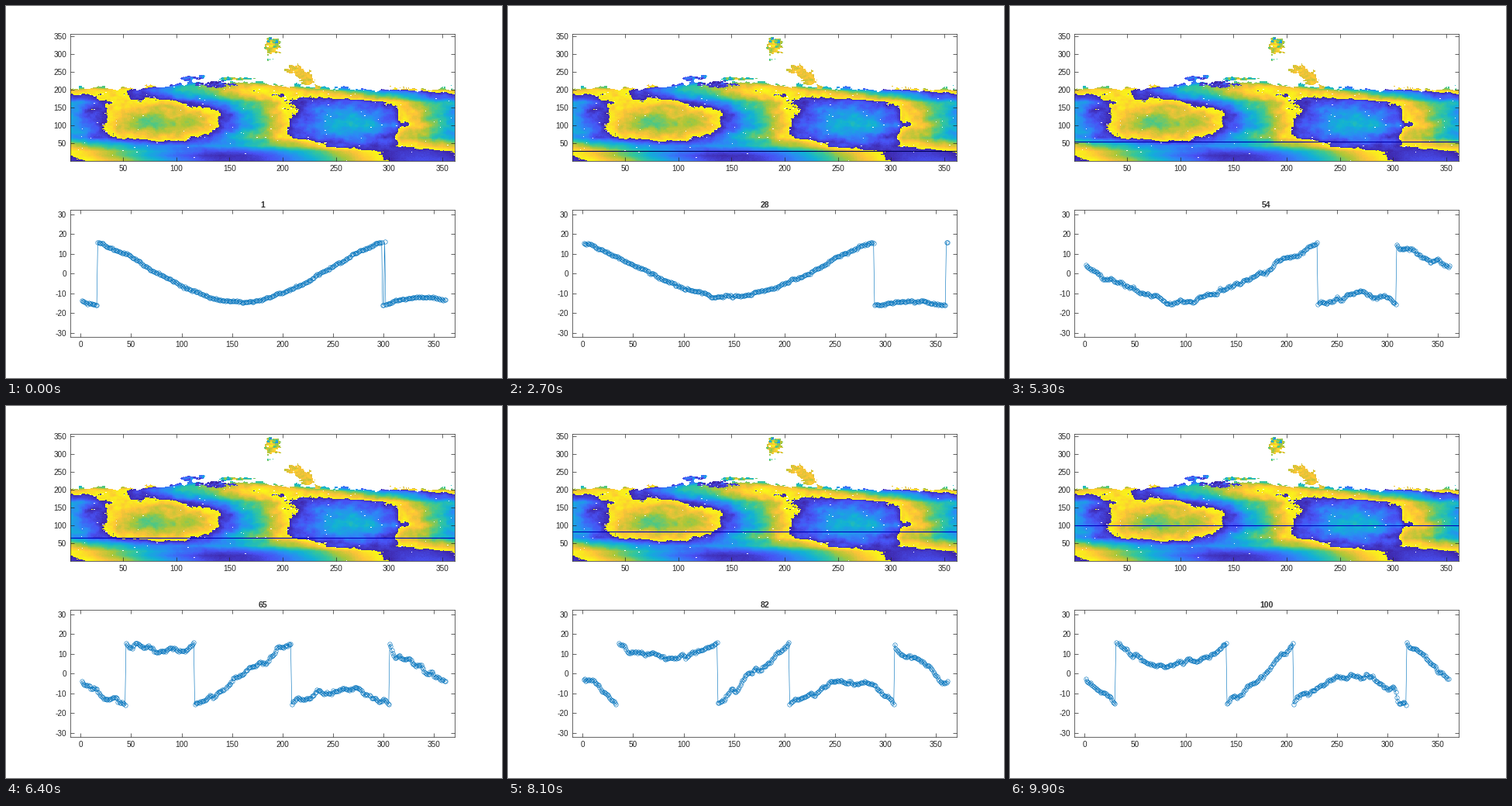
A matplotlib script for the animation above (10000 ms loop, 640 px wide and 480 px high).

```python
import numpy as np
import matplotlib.pyplot as plt
from matplotlib.animation import FuncAnimation
from matplotlib.colors import LinearSegmentedColormap

DPI = 100
PX = 72 / DPI
NX, NY, ROWS = 361, 355, 100
HALF = 16
INK = "#262626"

plt.rcParams["font.family"] = "Liberation Sans"
plt.rcParams["font.size"] = 10 * PX
plt.rcParams["axes.unicode_minus"] = False

parula = LinearSegmentedColormap.from_list("parula8", [
    "#3e26a8", "#4852f4", "#2e87f7", "#12b1d6",
    "#37c897", "#abc739", "#fec338", "#f9fb15"])

rng = np.random.default_rng(7)
cols = np.arange(1, NX + 1)
X, Y = np.meshgrid(cols, np.arange(1, NY + 1))


def smooth_noise(nx, ny):
    """Unit noise, blurred nx times sideways and ny times vertically."""
    a = rng.standard_normal((NY, NX))
    for axis, n in ((1, nx), (0, ny)):
        for _ in range(n):
            a = (np.roll(a, 1, axis) + a + np.roll(a, -1, axis)) / 3
    return a / a.std()


def bell(x, centre, width, power=2):
    return np.exp(-np.abs((x - centre) / width) ** power)


def clean_phase(edge):
    """One cosine around the circle whose shape drifts with height."""
    keys = [1, 16, 28, 43, 65, 100, 130, 165, 178, 200, 215]
    mean = np.interp(Y, keys, [-29, -30, -28.5, -27, -30.2, -30.5,
                               -32, -30.5, -32.5, -34, -37])
    amp = np.interp(Y, keys, [17, 17, 15, 12, 22, 30, 27, 20, 16.5, 16, 17])
    peak = np.interp(Y, keys, [338, 328, 325, 288, 257, 267,
                               263, 256, 222, 192, 180])
    phase = mean + amp * np.cos(2 * np.pi * (X - peak) / NX)
    # abrupt right flank and lower tip of the blue cell
    flank = np.exp(-np.clip(X - 309, 0, None) / 30) / (1 + np.exp(309 - X))
    phase -= 8 * flank * bell(Y, 100, 50, 4)
    phase += 6 * bell(X, 250, 14) * bell(Y, 43, 8)
    # falling rim under the surface
    return phase - 9 * np.exp(-np.clip(edge - Y, 0, None) / 5)


def build_map():
    coarse, rough = smooth_noise(40, 100), smooth_noise(5, 25)
    fine, grain = smooth_noise(1, 4), smooth_noise(0, 0)

    edge = 201 + 22 * bell(cols, 150, 65) + 4 * bell(cols, 0, 60)
    calm = np.clip((Y - 16) / 50, 0, 1)
    phase = clean_phase(edge)
    phase += (0.2 + 0.8 * calm) * coarse + (0.1 + 0.6 * calm) * rough
    phase += (0.1 + 0.2 * calm) * fine + 0.2 * grain
    wrapped = (phase + HALF) % (2 * HALF) - HALF
    solid = Y + 3 * rough + 2 * fine < edge

    def patch(cx, cy, rx, ry, value, slant=0.0, spread=2.0):
        dx = X - cx - slant * (Y - cy)
        r = np.hypot(dx / rx, (Y - cy) / ry) + 0.2 * rough + 0.15 * fine
        hit = r < 1
        wrapped[hit] = np.clip(value + spread * fine, -HALF, HALF)[hit]
        solid[hit] = True

    patch(137, 215, 17, 8, -13)
    patch(114, 231, 9, 6, -9, spread=3)
    patch(124, 236, 4, 5, -6, spread=3)
    patch(157, 230, 14, 4, 5, spread=4)
    patch(190, 322, 6.5, 25, 9, spread=3)
    patch(190, 336, 4, 7, 0, spread=4)
    patch(218, 242, 8, 33, 10.5, slant=-0.35, spread=1)

    # dropouts, more frequent next to the phase jumps
    drop = np.where((np.abs(wrapped) > 15.6) & (Y > 30), 0.1, 0.003)
    solid &= rng.random((NY, NX)) > drop
    return np.where(solid, wrapped, np.nan)


phase_map = build_map()

fig = plt.figure(figsize=(640 / DPI, 480 / DPI), dpi=DPI, facecolor="white")


def panel(bottom, xticks, yticks):
    ax = fig.add_axes([0.13, bottom, 0.774, 0.3412])
    ax.set_xticks(xticks)
    ax.set_yticks(yticks)
    ax.tick_params(direction="in", top=True, right=True, length=5 * PX,
                   width=0.7 * PX, pad=5 * PX, color=INK, labelcolor=INK)
    for s in ax.spines.values():
        s.set(linewidth=0.7 * PX, color=INK)
    return ax


top = panel(0.5838, range(50, 351, 50), range(50, 351, 50))
top.imshow(phase_map, origin="lower", aspect="auto", cmap=parula,
           vmin=-HALF, vmax=HALF, interpolation="nearest",
           extent=(0.5, NX + 0.5, 0.5, NY + 0.5))
scan, = top.plot([0.5, NX + 0.5], [1, 1], lw=1.1 * PX)
top.set(xlim=(0.5, NX + 0.5), ylim=(0.5, NY + 0.5))

low = panel(0.11, range(0, 351, 50), range(-30, 31, 10))
low.set(xlim=(-10, 370), ylim=(-32, 32))
curve, = low.plot([], [], "-o", color="#0072bd", lw=0.6 * PX,
                  ms=5.4 * PX, mfc="none", mew=0.6 * PX)
title = fig.text(331 / 640, 1 - 257 / 480, "", ha="center", va="center",
                 weight="bold", size=10.5 * PX, color="#333333")


def draw(i):
    y = i + 1
    scan.set_ydata([y, y])
    scan.set_color((0, 0, min(0.75, y / 80)))
    curve.set_data(cols, phase_map[i])
    title.set_text(str(y))
    return scan, curve, title


anim = FuncAnimation(fig, draw, frames=ROWS, interval=100, repeat=True)
plt.show()
```
